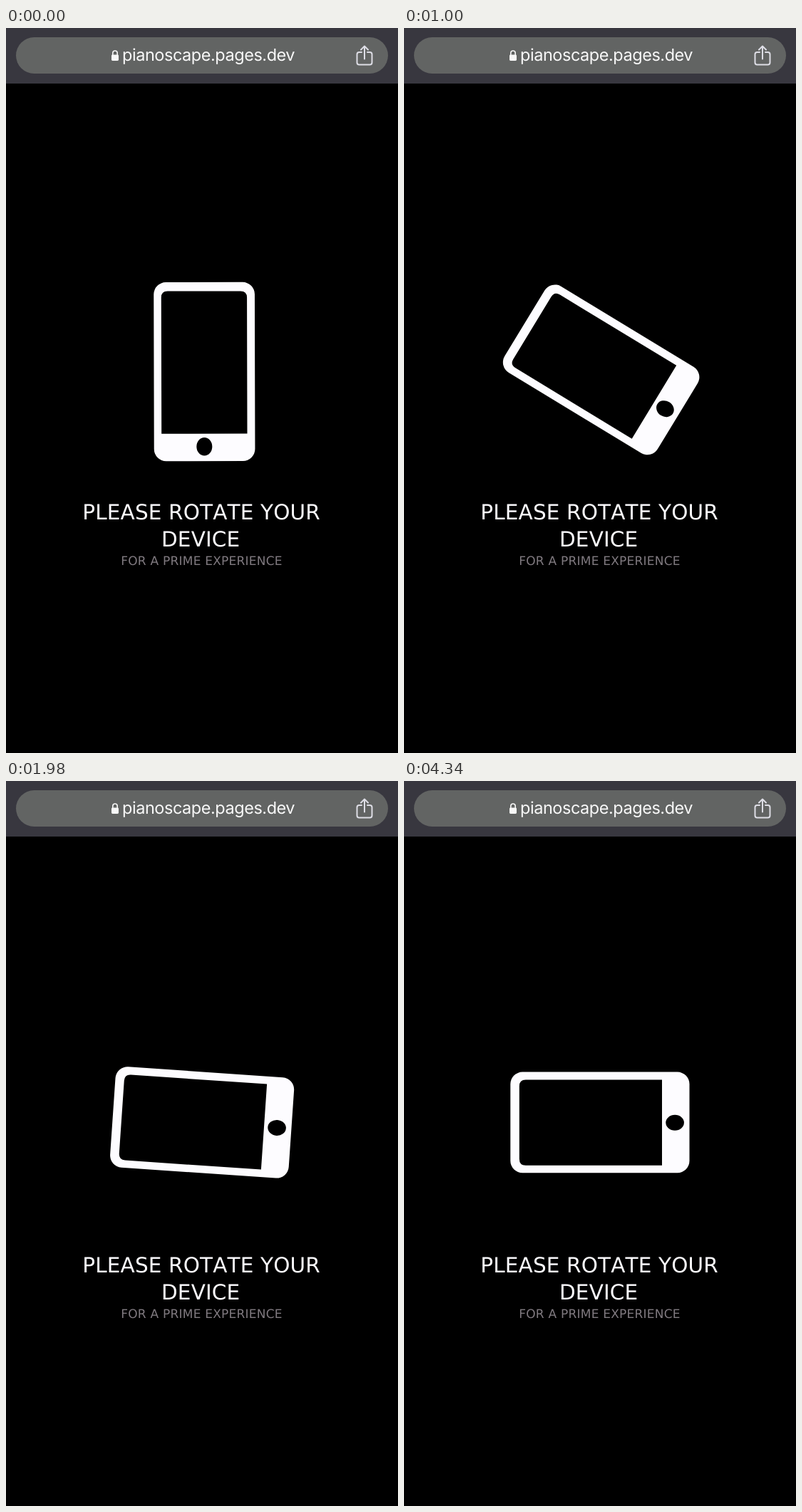
Write an HTML page that moves like this. It is 550x1018 px and loops after 4.36 s.

```html
<!DOCTYPE html>
<html lang="en">
<head>
<meta charset="utf-8">
<title>Rotate your device</title>
<style>
  html, body { margin: 0; width: 100%; height: 100%; overflow: hidden; background: #000; }
  svg { display: block; width: 100%; height: 100%; }
  text { text-rendering: geometricPrecision; }
  .address { font: 23.5px Inter, sans-serif; letter-spacing: -.46px; fill: #f8f8f8; }
  .notice { font-family: "DejaVu Sans", sans-serif; font-kerning: none; }
  .title { font-size: 29.5px; letter-spacing: .14px; fill: #fdfcff; }
  .hint { font-size: 17px; letter-spacing: .23px; fill: #807a80; }
</style>
</head>
<body>
<svg viewBox="0 0 550 1018">
  <rect width="550" height="1018"/>

  <g id="toolbar">
    <rect width="550" height="78" fill="#38373f"/>
    <rect x="14" y="13" width="522" height="51" rx="25.5" fill="#626463"/>
    <rect x="148" y="37.5" width="10" height="8.5" rx="1.4" fill="#f8f8f8"/>
    <path d="M149.8 38v-2.800a3.200 3.200 0 0 1 6.400 0V38" fill="none" stroke="#f8f8f8" stroke-width="1.6"/>
    <text class="address" x="163" y="46">pianoscape.pages.dev</text>
    <path d="M499 34h-3.500q-3 0-3 3v11.500q0 3 3 3h15q3 0 3-3V37q0-3-3-3H507M503 43.500V25.500M498 30.500l5-5 5 5"
      fill="none" stroke="#dedee6" stroke-width="2" stroke-linecap="round" stroke-linejoin="round"/>
  </g>

  <g id="phone">
    <rect x="207.5" y="357" width="141.700" height="251.200" rx="17" fill="#fdfcff"/>
    <path d="M218 569.700V378.500q0-9 9-9h102.300q9 0 9 9V569.700z"/>
    <ellipse cx="278.100" cy="587.800" rx="11" ry="12.800"/>
  </g>

  <g class="notice">
    <text class="title" x="107.300" y="690">PLEASE ROTATE YOUR</text>
    <text class="title" x="218" y="728">DEVICE</text>
    <text class="hint" x="161.200" y="753.800">FOR A PRIME EXPERIENCE</text>
  </g>
</svg>
<script>
  const LOOP = 4360;
  const TURN_STEPS = 58.5;
  const PIVOT = '275.05 482.75';
  const phone = document.getElementById('phone');

  // Steps arrive in an uneven 100, 20, 20 ms rhythm.
  function stepAt(ms) {
    const beat = Math.floor((ms - 20) / 140);
    const rest = ms - 20 - beat * 140;
    return beat * 3 + 1 + (rest >= 100) + (rest >= 120);
  }

  const bezier = (a, b, u) => 3 * a * u * (1 - u) ** 2 + 3 * b * u * u * (1 - u) + u ** 3;

  // cubic-bezier(.25, .1, .25, 1), solved by bisection
  function ease(x) {
    if (x >= 1) return 1;
    let low = 0, high = 1;
    for (let i = 0; i < 24; i++) {
      const mid = (low + high) / 2;
      if (bezier(.25, .25, mid) < x) low = mid; else high = mid;
    }
    return bezier(.1, 1, low);
  }

  function render(ms) {
    const angle = -90 * ease((stepAt(ms % LOOP) + .2) / TURN_STEPS);
    phone.setAttribute('transform', `rotate(${angle} ${PIVOT})`);
  }

  const start = performance.now();
  function tick() {
    render(performance.now() - start);
    requestAnimationFrame(tick);
  }
  tick();
</script>
</body>
</html>
```
